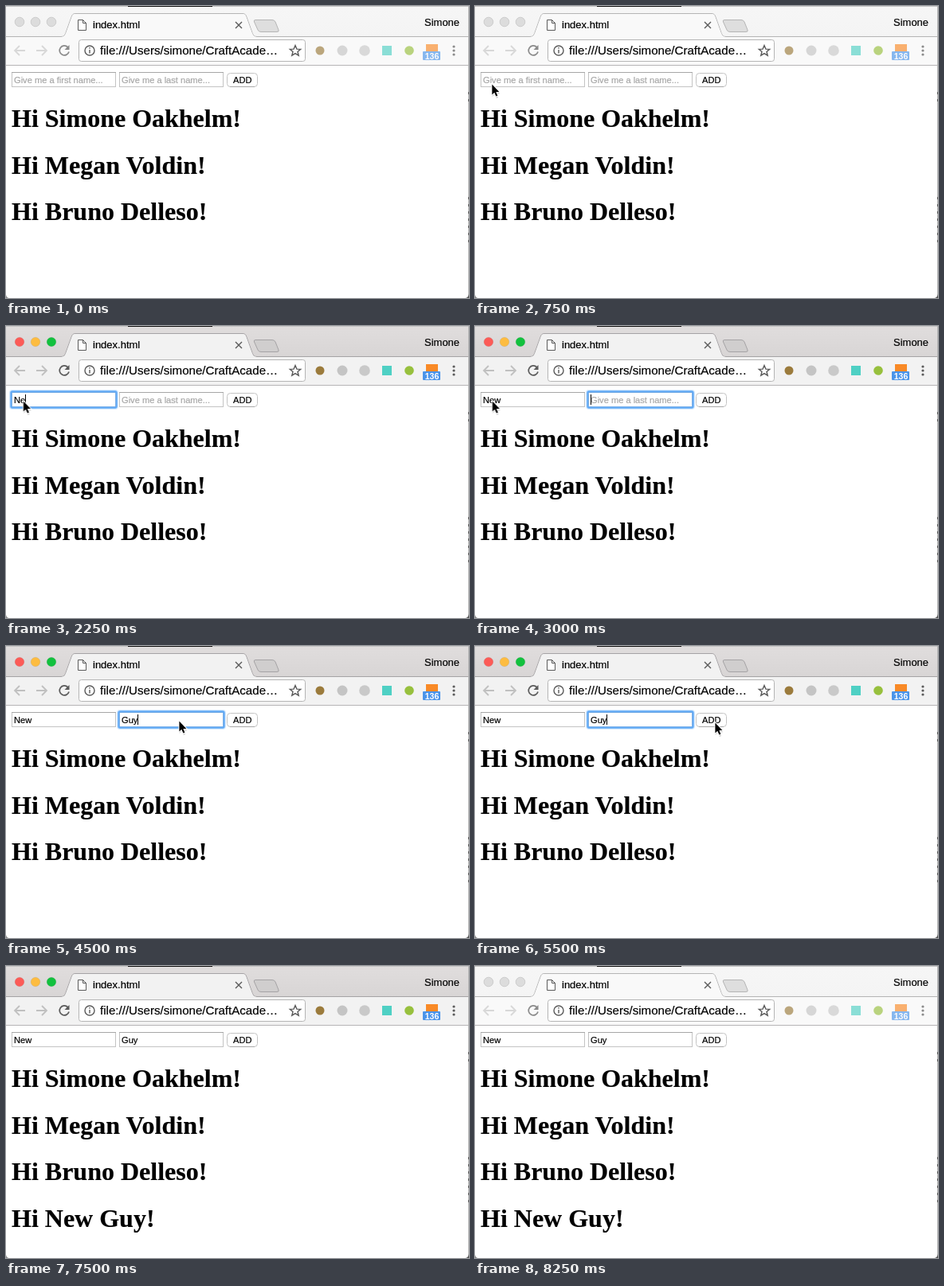
Animation of 581x367 px, one loop 8.75 s. Source, as an HTML page:

```html
<!DOCTYPE html>
<html lang="en">
<head>
<meta charset="utf-8">
<title>Name list</title>
<style>
  html, body { margin: 0; width: 100%; height: 100%; overflow: hidden; background: #fff; }
  svg { display: block; width: 581px; height: 367px; font-family: "Liberation Sans", Arial, sans-serif; }

  /* Every part holds its pose until the next key time. */
  .stage, .cursor, .caret, .ring, .cover, .hint, .added {
    animation: 8750ms step-end infinite;
  }

  .stage { animation-name: activate; }
  .cursor { animation-name: point; }
  .caret { animation-name: caret; }
  .ring { animation-name: focus; }
  .cover.first { animation-name: type-first; }
  .cover.last { animation-name: type-last; }
  .hint.first { animation-name: hint-first; }
  .hint.last { animation-name: hint-last; }
  .added { animation-name: add; }

  @keyframes activate {
    0%, 94.28%, 100% {
      --top: #f6f6f6; --low: #f4f4f4; --bar: #f9f9f9; --edge: #b5b5b5; --plus: #dedede;
      --red: #dcdcdc; --amber: #dcdcdc; --green: #dcdcdc; --rim: #cdcdcd;
      --nav: #d8d8d8; --ink: #8a8a8a; --fade: .65;
    }
    11.42% {
      --top: #e0dddd; --low: #d8d5d5; --bar: #f2f2f2; --edge: #a5a3a5; --plus: #d0cece;
      --red: #fc5b57; --amber: #fdbc40; --green: #12c13e; --rim: #0001;
      --nav: #c0c0c0; --ink: #5a5a5a; --fade: 1;
    }
  }
  @keyframes point {
    0%, 79.99%, 100% { transform: translate(-40px, -40px); }
    2.85% { transform: translate(66px, 145px); }
    5.71% { transform: translate(7px, 112px); }
    8.57% { transform: translate(21px, 98px); }
    11.42% { transform: translate(21.5px, 94px); }
    51.42% { transform: translate(217px, 94px); }
    54.28% { transform: translate(391px, 146px); }
    57.14% { transform: translate(315px, 98px); }
    59.99% { transform: translate(304px, 97px); }
    62.85% { transform: translate(301px, 96px); }
    77.14% { transform: translate(440px, 73px); }
  }
  @keyframes caret {
    0%, 17.14%, 45.71%, 54.28%, 65.71%, 100% { transform: translateX(-20px); }
    11.42% { transform: translateX(10px); }
    22.85% { transform: translateX(18px); }
    25.71% { transform: translateX(24px); }
    28.57% { transform: translateX(33px); }
    34.28% { transform: translateX(145px); }
    37.14% { transform: translateX(153px); }
    39.99% { transform: translateX(160px); }
    48.57%, 59.99% { transform: translateX(165px); }
  }
  @keyframes focus {
    0%, 65.71%, 100% { transform: translateX(-300px); }
    11.42% { transform: translateX(0); }
    34.28% { transform: translateX(135px); }
  }
  @keyframes type-first {
    0% { transform: none; }
    22.85% { transform: translateX(8px); }
    25.71% { transform: translateX(14.3px); }
    28.57%, 100% { transform: translateX(24px); }
  }
  @keyframes type-last {
    0% { transform: none; }
    37.14% { transform: translateX(8.6px); }
    39.99% { transform: translateX(14.9px); }
    48.57%, 100% { transform: translateX(24px); }
  }
  @keyframes hint-first { 0% { opacity: 1; } 22.85%, 100% { opacity: 0; } }
  @keyframes hint-last { 0% { opacity: 1; } 37.14%, 100% { opacity: 0; } }
  @keyframes add { 0% { opacity: 0; } 65.71%, 100% { opacity: 1; } }

  /* A hairline stroke gives the heavier text smoothing of the desktop. */
  text { stroke: #000; stroke-width: .2; }
  .title { font-size: 13px; }
  .url { font-size: 15.1px; }
  .field { font-size: 11.1px; }
  .hint { fill: #a6a6a6; stroke: #a6a6a6; }
  .badge { font-size: 10.5px; font-weight: bold; fill: #fff; stroke: none; text-anchor: middle; }
  .box { fill: #fff; stroke: #c3c3c3; }
  .cover { fill: #fff; }
  .heads { font: bold 32px "Liberation Serif", Times, serif; }
  .line { fill: none; stroke: #5a5a5a; stroke-width: 1.4; }
  .reload { stroke: var(--ink); stroke-width: 1.7; }
  .ink { fill: var(--ink); }
  .nav { fill: none; stroke: var(--nav); stroke-width: 1.8; }
  .edge { stroke: var(--edge); }
  .icons { opacity: var(--fade); }
</style>
</head>
<body>
<svg class="stage" viewBox="0 0 581 367">
  <defs>
    <linearGradient id="strip" x2="0" y2="1">
      <stop style="stop-color:var(--top)"/>
      <stop offset="1" style="stop-color:var(--low)"/>
    </linearGradient>
  </defs>
  <rect width="581" height="367" fill="#fff"/>

  <!-- Title strip and tab -->
  <rect width="581" height="39" fill="url(#strip)"/>
  <path d="M0 .5H581" stroke="#c4c4c4"/>
  <path d="M153 .5H259" stroke="#111"/>
  <rect y="38" width="581" height="37" style="fill:var(--bar)"/>
  <path class="edge" d="M0 38.5H69C73 38.5 74 36 75 33.5L82 14C83 11 84 9.5 87 9.5H297C300 9.5 301 11 302 14L309 33.5C310 36 311 38.5 315 38.5H581" style="fill:none"/>
  <path d="M70 39C73.5 39 74.5 36 75.5 33.5L82.5 14C83.5 11 84.5 10 87 10H297C299.5 10 300.5 11 301.5 14L308.5 33.5C309.5 36 310.5 39 314 39Z" style="fill:var(--bar)"/>
  <path class="edge" d="M313 17.5H334Q337 17.5 338 20L342 30Q343 32.5 340 32.5H320Q317 32.5 316 30L311.5 20Q310.5 17.5 313 17.5Z" style="fill:var(--plus)"/>
  <g style="stroke:var(--rim)">
    <circle cx="17" cy="20" r="5.8" style="fill:var(--red)"/>
    <circle cx="37" cy="20" r="5.8" style="fill:var(--amber)"/>
    <circle cx="57" cy="20" r="5.8" style="fill:var(--green)"/>
  </g>
  <path d="M90.5 17.5H96.5L100.5 21.5V30.5H90.5ZM96.5 17.5V21.5H100.5" fill="#fff" stroke="#5a5a5a"/>
  <text class="title" x="109" y="28">index.html</text>
  <path class="line" d="M288 20L296 28M296 20L288 28"/>
  <text class="title" x="525" y="25">Simone</text>

  <!-- Toolbar -->
  <path d="M0 74.5H581" stroke="#b6b4b6"/>
  <path class="nav" d="M24 56H11M17 50L11 56L17 62"/>
  <path class="nav" d="M38 56H51M45 50L51 56L45 62"/>
  <path class="line reload" d="M77.5 51.7A6 6 0 1 0 79 57.5"/>
  <path class="ink" d="M79.5 49V55H73.5Z"/>
  <rect x="91.5" y="42.5" width="284" height="27" rx="3" fill="#fff" stroke="#b5b5b5"/>
  <circle class="line" cx="105" cy="56" r="6"/>
  <path class="line" d="M105 55V59.5M105 52V53.6"/>
  <text class="url" x="118" y="61">file:///Users/simone/CraftAcade…</text>
  <path class="line" d="M363 49.5L364.9 54.1L369.7 54.4L366 57.5L367.2 62.2L363 59.6L358.8 62.2L360 57.5L356.3 54.4L361.1 54.1Z"/>
  <g class="icons">
    <circle cx="394" cy="56" r="5.5" fill="#9b7b3c"/>
    <circle cx="422" cy="56" r="6.5" fill="#c4c4c4"/>
    <circle cx="450" cy="56" r="6.8" fill="#c9c9c9"/>
    <rect x="472" y="50" width="12" height="12" fill="#4fd0c4"/>
    <circle cx="506" cy="56" r="5.8" fill="#97c03d"/>
    <rect x="527" y="48" width="15" height="10" fill="#f98a26"/>
    <rect x="523" y="57" width="22" height="11" rx="1" fill="#4a94ea"/>
    <text class="badge" x="534.5" y="66.5">136</text>
  </g>
  <g class="ink">
    <circle cx="562" cy="51" r="1.6"/>
    <circle cx="562" cy="56" r="1.6"/>
    <circle cx="562" cy="61" r="1.6"/>
  </g>

  <!-- Form -->
  <g class="field">
    <rect class="box" x="7.5" y="83.5" width="130" height="18"/>
    <rect class="box" x="142.5" y="83.5" width="130" height="18"/>
    <path d="M7 83.5H138M142 83.5H273" stroke="#a6a6a6"/>
    <g class="ring" fill="none" stroke="#62aaf6">
      <rect x="5" y="81" width="135" height="23" rx="3" stroke-width="2" opacity=".25"/>
      <rect x="6.5" y="82.5" width="132" height="20" rx="1.5" stroke-width="2.4"/>
    </g>
    <text x="10" y="97">New</text>
    <text x="145" y="97">Guy</text>
    <rect class="cover first" x="10" y="86" width="60" height="14"/>
    <rect class="cover last" x="145" y="86" width="60" height="14"/>
    <text class="hint first" x="10" y="97">Give me a first name...</text>
    <text class="hint last" x="145" y="97">Give me a last name...</text>
    <rect class="caret" y="86" width="1" height="13"/>
    <rect x="277.5" y="84.5" width="38" height="17" rx="4" fill="#fff" stroke="#c4c4c4"/>
    <path d="M281 101.5H312" stroke="#a9a9a9"/>
    <text x="285" y="97">ADD</text>
  </g>

  <!-- Greetings -->
  <g class="heads">
    <text x="7" y="152">Hi Simone Oakhelm!</text>
    <text x="7" y="211">Hi Megan Voldin!</text>
    <text x="7" y="269">Hi Bruno Delleso!</text>
    <text class="added" x="7" y="328">Hi New Guy!</text>
  </g>

  <!-- Window edge -->
  <path d="M580.5 0V367" stroke="#b4b4b4"/>
  <path d="M580.5 108V121M580.5 240V300" stroke="#555" stroke-dasharray="3 6"/>
  <path d="M581 362V367H576Q580 367 581 362Z" fill="#555"/>
  <path d="M0 363V367H4Q1 367 0 363Z" fill="#888"/>

  <g class="cursor">
    <path d="M0 1V15L3.2 12.1L5.3 17L7.6 16L5.5 11.2H9.8Z" fill="#0003" transform="translate(.5 1)"/>
    <path d="M.4 .6V13.6L3.3 10.8L5.4 15.6L7.4 14.7L5.4 10H9.4Z" stroke="#fff" stroke-width="2" paint-order="stroke"/>
  </g>
</svg>
</body>
</html>
```
